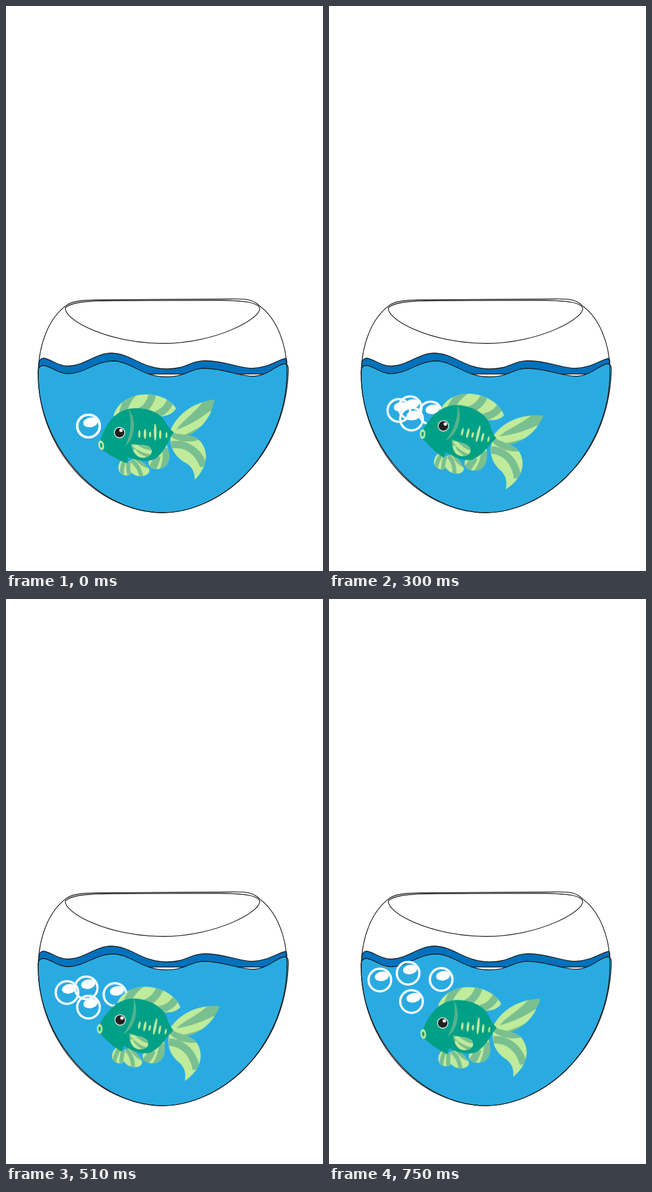
An HTML page without scripts for the animation above (0.99 s loop, 561x998 px).

```html
<!DOCTYPE html>
<html lang="en">
<head>
<meta charset="utf-8">
<title>Fish bowl</title>
<style>
  html, body { margin: 0; width: 100%; height: 100%; overflow: hidden; background: #fff; }
  svg { display: block; width: 100%; height: 100%; }
  .line { fill: none; stroke: #1a1a1a; stroke-width: 1.3; }
  .water { fill: #29abe2; }
  .surface { fill: #0071bc; }
  .teal { fill: #00a087; }
  .light { fill: #bfeb9b; }
  .mid { fill: #7abf90; }
  .stripes { fill: none; stroke: #7abf90; stroke-width: 13; }
  .pale { stroke: #bfeb9b; }

  /* 33 ticks of 30 ms: 25 of movement, then a pause */
  .fish, .bubble { animation: 990ms -1ms infinite; }
  .fish { animation-name: sway; transform-origin: 252px 754px; }
  .bubble { animation-name: rise; }
  .drift { animation-name: drift; }

  @keyframes sway {
    0% { transform: rotate(0deg); animation-timing-function: steps(4); }
    12.1212% { transform: rotate(4.5deg); animation-timing-function: steps(4); }
    24.2424% { transform: rotate(9.7deg); animation-timing-function: steps(4); }
    36.3636% { transform: rotate(17deg); animation-timing-function: steps(5); }
    51.5152% { transform: rotate(11.2deg); animation-timing-function: steps(4); }
    63.6364% { transform: rotate(7.6deg); animation-timing-function: steps(4); }
    75.7576%, 100% { transform: rotate(5.2deg); }
  }
  @keyframes rise {
    0% { transform: translate(0, 0); animation-timing-function: steps(25); }
    75.7576%, 100% { transform: translate(var(--x), var(--y)); }
  }
  @keyframes drift {
    0% { transform: translate(0, 0); animation-timing-function: steps(13); }
    39.3939% { transform: translate(44px, -30px); animation-timing-function: steps(12); }
    75.7576%, 100% { transform: translate(52.5px, -70px); }
  }
</style>
</head>
<body>
<svg viewBox="0 0 561 998">
  <defs>
    <g id="bubble">
      <circle cx="146" cy="742" r="20" fill="none" stroke="#fff" stroke-width="4"/>
      <ellipse cx="149.5" cy="735.5" rx="12.5" ry="8.3" fill="#fff" transform="rotate(-10 149.5 735.5)"/>
    </g>
    <path id="dorsal" d="M190 724C197 699 222 686 248 686C275 686 294 698 301 711C296 718 288 725 271 725L235 740Z"/>
    <path id="tailTop" d="M290 752C301 725 326 701 369 695C366 717 352 742 328 756C316 762 304 756 290 752Z"/>
    <path id="tailLow" d="M290 753C308 757 325 757 337 763C351 772 356 790 353 804C350 818 342 829 334 837C334 824 330 815 320 808C300 798 291 782 291 764Z"/>
    <path id="anal" d="M284 774C292 794 292 815 269 818C257 819 250 813 253 802C268 798 279 789 284 774Z"/>
    <path id="pelvic" d="M213 799C202 801 198 809 199 818C200 827 208 830 217 829C220 828 221 826 222 824C228 831 239 832 247 829C253 826 256 821 252 816C246 808 238 804 230 797L216 806Z"/>
    <path id="pectoral" d="M221 773C231 777 245 772 255 779C262 787 256 798 243 798C230 798 224 786 221 773Z"/>
    <clipPath id="inDorsal"><use href="#dorsal"/></clipPath>
    <clipPath id="inTailTop"><use href="#tailTop"/></clipPath>
    <clipPath id="inTailLow"><use href="#tailLow"/></clipPath>
    <clipPath id="inAnal"><use href="#anal"/></clipPath>
    <clipPath id="inPelvic"><use href="#pelvic"/></clipPath>
    <clipPath id="inPectoral"><use href="#pectoral"/></clipPath>
  </defs>

  <!-- bowl and water -->
  <path class="line surface" d="M58 650C56 628 60 622 67 622C80 624 92 636 110 636C140 635 158 613 187 613C222 614 240 641 285 641C320 641 325 627 352 626.500C390 627 410 640 436 640C465 639 480 625 495 622.500C498 624 497 630 496 650Z"/>
  <path class="line water" d="M57 652C55 640 60 635 66 635C80 636 92 650 112 649.500C140 648 160 627 190 627C222 628 240 655 283 655C320 655 325 640 352 640C390 641 410 654 438 654C465 653 480 632 494 632C500 633 500 640 499.500 648C496 725 465 790 417 834C378 872 325 895 278 895C160 895 57 775 57 652Z"/>
  <path class="line" d="M278 895C160 895 56 782 57 648C58 598 75 551 108 528C120 520 140 519 180 519L400 517.500C430 517 440 520 449 530C479 552 496 596 497 640C499 718 465 786 420 832C378 872 325 895 278 895Z"/>
  <path class="line" d="M105 533C116 523 145 520.500 190 520.500L380 520C420 520.500 446 523 449 534C451 552 372 596 278 596C180 596 102 554 105 533Z"/>

  <g>
    <use class="bubble" href="#bubble" style="--x:0px;--y:-31px"/>
    <use class="bubble" href="#bubble" style="--x:-56px;--y:-69px"/>
    <use class="bubble" href="#bubble" style="--x:-6px;--y:-81px"/>
    <use class="bubble drift" href="#bubble"/>
  </g>

  <g class="fish">
    <use class="light" href="#dorsal"/>
    <path class="stripes" clip-path="url(#inDorsal)" d="M206 722Q210 700 225 684M238 716Q256 706 260 682M266 722Q286 714 292 694"/>
    <use class="mid" href="#tailTop"/>
    <path class="stripes pale" clip-path="url(#inTailTop)" d="M292 752C304 728 323 722 344 694M300 756C324 748 342 738 366 720"/>
    <use class="light" href="#tailLow"/>
    <path class="stripes" clip-path="url(#inTailLow)" d="M292 753C308 766 328 764 340 760M293 775C320 772 340 786 350 813"/>
    <use class="light" href="#anal"/>
    <path class="stripes" stroke-width="8" clip-path="url(#inAnal)" d="M267 795Q265 808 257 820M283 780Q286 803 278 820"/>
    <use class="light" href="#pelvic"/>
    <g class="stripes" clip-path="url(#inPelvic)" style="stroke-width:7">
      <path d="M211 801Q204 812 205 832M217 805Q215 818 219 832M222 803Q236 812 240 833M231 799Q242 812 256 814"/>
    </g>

    <path class="teal" d="M167 769C174 742 191 717 216 712C245 707 270 716 281 733C286 742 290 748 297 753C287 766 283 786 264 800C246 807 230 802 216 797L215 808C200 803 185 794 172 785Z"/>
    <path fill="#55b28b" d="M217 712C231 730 230 762 211 778C220 758 224 735 217 712Z"/>
    <use class="mid" href="#pectoral"/>
    <path class="stripes pale" clip-path="url(#inPectoral)" style="stroke-width:7" d="M226 775Q245 790 262 788M226 784Q232 795 246 799"/>
    <g class="light">
      <ellipse cx="236" cy="756" rx="1.900" ry="7"/>
      <ellipse cx="246" cy="756" rx="2.200" ry="9"/>
      <ellipse cx="255" cy="757" rx="1.900" ry="5"/>
      <ellipse cx="264" cy="753" rx="2.300" ry="15"/>
      <ellipse cx="273" cy="757" rx="2" ry="8"/>
      <ellipse cx="284" cy="758" rx="1.600" ry="5"/>
      <ellipse cx="168.500" cy="776" rx="5" ry="8.500" transform="rotate(-12 168.500 776)"/>
    </g>
    <ellipse class="teal" cx="168.500" cy="776" rx="2" ry="4.200" transform="rotate(-12 168.500 776)"/>
    <circle cx="201" cy="753.500" r="10" fill="#eef6ee"/>
    <circle cx="201" cy="753.500" r="8.500" fill="#231f20"/>
    <circle cx="203.500" cy="749.500" r="3" fill="#fff"/>
  </g>
</svg>
</body>
</html>
```
